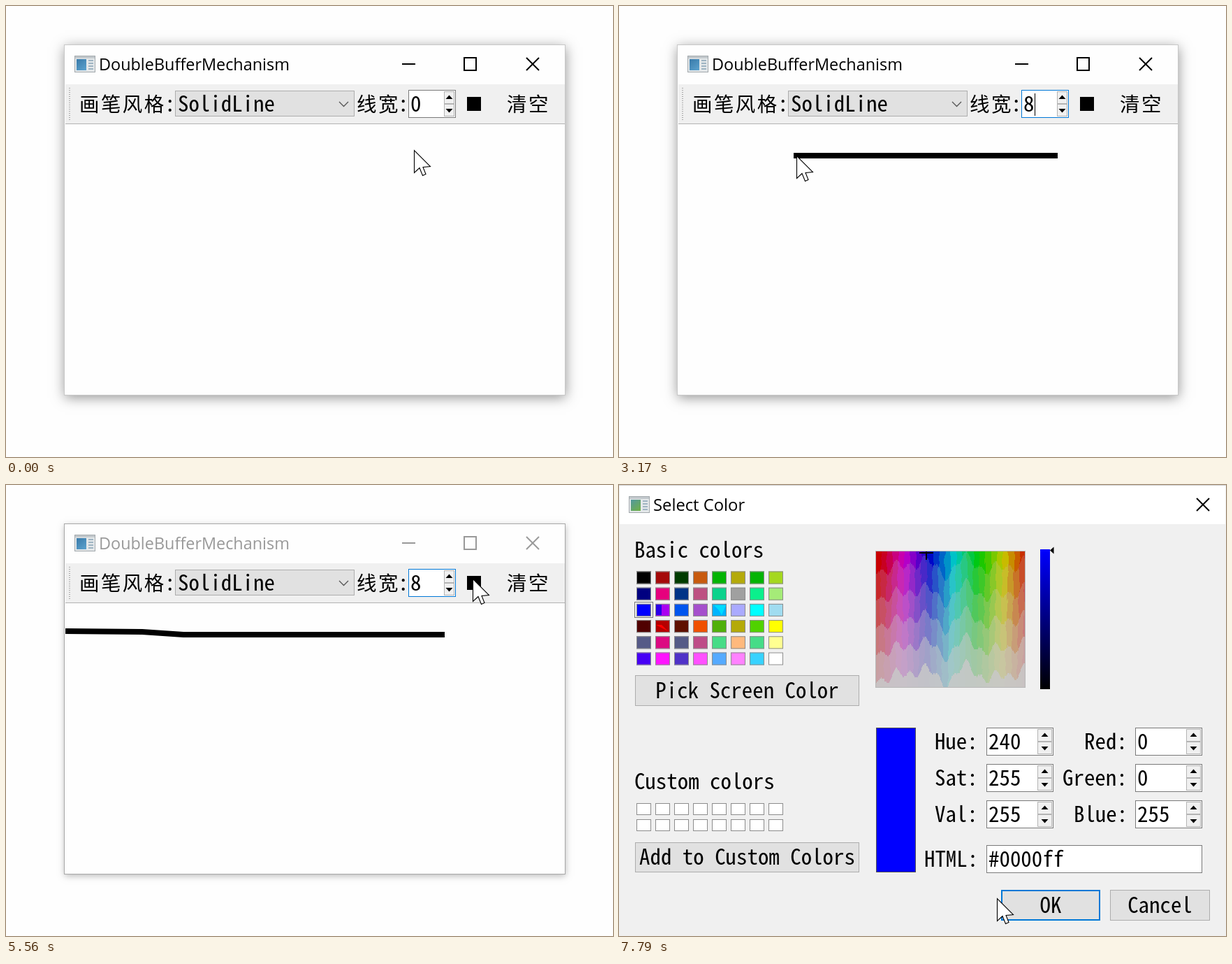
Write an HTML page with a canvas that moves like this. It is 869 by 645 pixels and loops after 7990 ms.

```html
<!DOCTYPE html>
<html lang="zh">
<head>
<meta charset="utf-8">
<title>DoubleBufferMechanism</title>
<style>
  html, body { margin: 0; width: 100%; height: 100%; overflow: hidden; background: #fefefe; }
  canvas { display: block; }
</style>
</head>
<body>
<canvas id="stage" width="869" height="645"></canvas>
<script>
const W = 869, H = 645, LOOP = 7990;
const BLUE = '#0078d7', UI_FONT = '"Open Sans", "Noto Sans", sans-serif';
const MONO = '"Noto Sans Mono CJK SC", "Noto Sans Mono", monospace';
const HAN = '"Noto Sans CJK SC", "Noto Sans CJK", sans-serif';
const CELL = 15.44;

const path = [
  [584, 206], [560, 176], [488, 142], [545, 138], [600, 131], [604, 129], [605, 128], [600, 130],
  [590, 130], [490, 146], [499, 218], [500, 217], [560, 216], [624, 214], [480, 214], [254, 214],
  [195, 210], [89, 209], [215, 213], [353, 229], [430, 190], [486, 150], [560, 146], [605, 131],
  [668, 136], [668, 134], [668, 134], [668, 134], [645, 103], [500, 115], [292, 150], [180, 165],
  [100, 178], [47, 187], [34, 184], [30, 181], [28, 179], [365, 350], [541, 591]
];
const AT = { focus: 6, select: 7, type: 11, draw: 13, drawn: 17, press: 25, inactive: 26, dialog: 28, pick: 37 };
const startOf = i => i && 160 + 200 * i + 10 * ((i > 29) + (i > 31) + (i > 32));
const starts = path.map((_, i) => startOf(i));

const palette = [
  '#000 #a50a0a #003c00 #c85a0e #04b404 #b4aa0a #04b404 #a5d81e',
  '#000f78 #e6007d #003487 #bd5082 #0cd28c #a0a0a0 #0af08c #a5eb78',
  '#4b00f0 #aa00f0 #0055ee #a550cc #00b4ff #aaaaff #0ff #a0dcf0',
  '#500000 #b40000 #5f1000 #f05000 #50b00a #b4aa0a #50d200 #ff0',
  '#555a87 #dc0a82 #555a87 #be4b87 #46dc87 #ffb97d #46dc87 #ffff91',
  '#4600f5 #ff14ff #5032c8 #ff50ff #55aaff #ff82ff #37d2ff #fff'
].map(row => row.split(' '));

function newCanvas(w, h) {
  return Object.assign(document.createElement('canvas'), { width: w, height: h });
}
const screen = document.getElementById('stage').getContext('2d');
const layer = newCanvas(W, H).getContext('2d');
let g = screen;

// Font size that gives the half-width character cell
g.font = `100px ${MONO}`;
const monoSize = 100 * CELL / g.measureText('0').width;

function fill(x, y, w, h, color) {
  g.fillStyle = color;
  g.fillRect(x, y, w, h);
}
function box(x, y, w, h, color, border, line = 1) {
  fill(x, y, w, h, color);
  g.strokeStyle = border;
  g.lineWidth = line;
  g.strokeRect(x + line / 2, y + line / 2, w - line, h - line);
}
function stroke(points, color, width) {
  g.beginPath();
  points.forEach(p => g.lineTo(...p));
  g.strokeStyle = color;
  g.lineWidth = width;
  g.stroke();
}
function polygon(points, color) {
  g.beginPath();
  points.forEach(p => g.lineTo(...p));
  g.closePath();
  g.fillStyle = color;
  g.fill();
}
function text(str, x, y, color, font) {
  g.font = font;
  g.fillStyle = color;
  g.textAlign = 'left';
  g.fillText(str, x, y);
}
const mono = (str, x, y, color = '#000') => text(str, x, y, color, `${monoSize}px ${MONO}`);

function han(str, x, y) {
  [...str].forEach((c, i) => text(c, x + 1 + i * 2 * CELL, y, '#000', `300 28.5px ${HAN}`));
}
function closeMark(x, y, color) {
  stroke([[x - 9, y - 9], [x + 9, y + 9]], color, 2);
  stroke([[x + 9, y - 9], [x - 9, y + 9]], color, 2);
}
function icon(x, y, a, b) {
  box(x, y, 30, 24, '#e4e8ea', '#a2a8ac');
  fill(x + 1, y + 1, 28, 3, '#c3c9cd');
  const shade = g.createLinearGradient(x, y, x + 16, y + 20);
  shade.addColorStop(0, a);
  shade.addColorStop(1, b);
  fill(x + 3, y + 5, 14, 16, shade);
  for (let i = 0; i < 4; i++) fill(x + 20, y + 6 + i * 4, 7, 2, '#9fb4c2');
}
function button(label, x, y, w, h, main) {
  box(x, y, w, h, '#e1e1e1', main ? BLUE : '#adadad', main ? 2 : 1);
  mono(label, x + (w - label.length * CELL) / 2, y + h / 2 + 10.5);
}
function spin(x, y, w, value, arrowWidth, border = '#7a7a7a', color) {
  box(x, y, w, 40, '#fff', border);
  const left = x + w - arrowWidth - 2, mid = left + arrowWidth / 2;
  box(left, y + 2, arrowWidth, 18, '#f0f0f0', '#b4b4b4');
  box(left, y + 20, arrowWidth, 18, '#f0f0f0', '#b4b4b4');
  polygon([[mid - 5, y + 13], [mid + 5, y + 13], [mid, y + 7.5]], '#000');
  polygon([[mid - 5, y + 27], [mid + 5, y + 27], [mid, y + 32.5]], '#000');
  mono(value, x + 3, y + 31, color);
}

function mainWindow(step) {
  const [x, y] = path[step];
  const inside = (l, t, r, b) => step < AT.inactive && x >= l && x <= r && y >= t && y <= b;
  const active = step < AT.inactive, ink = active ? '#000' : '#999';

  g.save();
  g.shadowColor = active ? 'rgba(0,0,0,.42)' : 'rgba(0,0,0,.28)';
  g.shadowBlur = active ? 17 : 9;
  g.shadowOffsetY = active ? 3 : 2;
  fill(84, 56, 717, 501, '#fff');
  g.restore();
  box(83, 55, 718, 502, '#fefefe', active ? '#c8c8c8' : '#a8a8a8');

  icon(98, 71, '#2f6f9f', '#5aa0cc');
  text('DoubleBufferMechanism', 133, 92, ink, `23.4px ${UI_FONT}`);
  stroke([[567, 83], [586, 83]], ink, 2);
  g.strokeRect(656, 74, 17, 18);
  closeMark(754, 83, ink);

  fill(85, 112, 715, 56, '#f0f0f0');
  fill(85, 168, 715, 1, '#b2b2b2');
  for (let i = 117; i < 164; i += 3) fill(90, i, 2, 1, '#aaa');

  han('画笔风格', 104, 151);
  mono(':', 227, 151);
  const hot = inside(242, 121, 499, 158);
  box(242, 121, 257, 37, hot ? '#e5f1fb' : '#e1e1e1', hot ? BLUE : '#adadad');
  mono('SolidLine', 246, 151);
  stroke([[477, 137], [483.5, 143.5], [490, 137]], '#555', 1.3);

  han('线宽', 501, 151);
  mono(':', 561, 151);
  const selected = step >= AT.select && step < AT.type;
  spin(576, 120, 68, step < AT.type ? '0' : '8', 15, step < AT.focus ? '#7a7a7a' : BLUE);
  if (selected) {
    fill(579, 124, 16, 33, BLUE);
    mono('0', 579, 151, '#fff');
  } else if (step >= AT.focus && active && Math.floor(starts[step] / 530) % 2) {
    fill(595, 125, 1, 32, '#000');
  }

  if (inside(643, 114, 697, 166)) {
    box(643, 114, 54, 52, step < AT.press ? '#e5f3ff' : '#cce8ff', step < AT.press ? '#cce8ff' : '#99d1ff');
  }
  fill(660, 130, 20, 20, '#000');
  han('清空', 716, 151);

  if (step > AT.draw) {
    g.save();
    g.beginPath();
    g.rect(85, 169, 715, 386);
    g.clip();
    g.lineCap = 'square';
    stroke(path.slice(AT.draw, Math.min(step, AT.drawn) + 1), '#000', 8);
    g.restore();
  }
}

// Hue and saturation field, split into ragged patches
function makeSpectrum() {
  const w = 213, h = 194, c = newCanvas(w, h), p = c.getContext('2d');
  const wave = (v, k) => Math.sin(v * .13 + k) + Math.sin(v * .31 + k * 2.3) * .7;
  for (let x = 0; x < w; x++) {
    const column = Math.floor(x / 4);
    const ragged = wave(x, 1) * .22 + Math.sin(column * 12.9) * .2;
    for (let y = 0; y < h; y += 2) {
      const level = Math.round((1 - y / h) * 5 + ragged);
      const sat = Math.min(1, Math.max(.03, level / 5));
      const shift = wave(y, column % 7) * 1.2 + level * 1.7;
      const hue = Math.min(359, Math.max(0, Math.round((360 * (1 - x / w) + shift) / 14) * 14));
      const light = .785 * (1 - sat / 2);
      const s = .785 * sat / 2 / Math.min(light, 1 - light);
      p.fillStyle = `hsl(${hue} ${s * 100}% ${light * 100}%)`;
      p.fillRect(x, y, 1, 2);
    }
  }
  return c;
}
const spectrum = makeSpectrum();

function swatches(picked) {
  palette.forEach((row, r) => row.forEach((color, c) => {
    const first = picked && c === 0;
    if (first && r === 1) color = '#000080';
    if (first && r === 2) color = '#0000ff';
    box(25 + 27 * c, 123.5 + 23.2 * r, 21, 18, color, '#8c8c8c');
  }));
  polygon([[136, 172], [153, 172], [147, 186], [143, 179]], '#00dcff');
  if (picked) {
    fill(53, 171, 8, 15, '#2a00e8');
    polygon([[53, 200], [61, 200], [70, 209]], '#f00');
  }
  for (let i = 0; i < 16; i++) {
    box(25 + 27 * (i % 8), 455 + 23 * Math.floor(i / 8), 21, 17, '#fff', '#8c8c8c');
  }
  g.save();
  g.setLineDash([1, 1]);
  g.strokeStyle = '#000';
  g.lineWidth = 1;
  g.strokeRect(22.5, picked ? 167.5 : 121.5, 26, 22);
  g.restore();
}

function dialog(picked) {
  const color = picked ? '#0000ff' : '#000000';
  fill(0, 0, W, H, '#f0f0f0');
  fill(0, 0, W, 1, '#d0d0d0');
  fill(1, 1, W - 2, 55, '#fff');
  icon(14, 16, '#4a90b8', '#6fb04a');
  text('Select Color', 49, 37, '#000', `23.8px ${UI_FONT}`);
  closeMark(836, 28, '#000');

  mono('Basic colors', 22, 104);
  mono('Custom colors', 22, 435);
  swatches(picked);
  button('Pick Screen Color', 23, 272, 321, 44);
  button('Add to Custom Colors', 23, 511, 321, 43);

  box(367, 94, 215, 196, '#ccc', '#b8b8b8');
  g.drawImage(spectrum, 368, 95);
  const [cx, cy] = picked ? [440, 97] : [580.5, 288.5];
  g.save();
  g.beginPath();
  g.rect(368, 95, 214, 195);
  g.clip();
  fill(cx - 10, cy - 1, 20, 2, '#000');
  fill(cx - 1, cy - 10, 2, 20, '#000');
  g.restore();

  const ramp = g.createLinearGradient(0, 92, 0, 292);
  ramp.addColorStop(0, picked ? '#00f' : '#fff');
  ramp.addColorStop(1, '#000');
  box(603, 92, 14, 200, ramp, picked ? ramp : '#a0a0a0');
  const mark = picked ? 93.5 : 291.5;
  polygon([[617, mark], [622.5, mark - 5], [622.5, mark + 5]], '#000');
  box(368, 347, 57, 207, color, '#505050');
  fill(369, 348, 55, 205, color);

  const fields = [
    ['Hue:', 452, 'Red:', 666, '240', '0'],
    ['Sat:', 452, 'Green:', 635, '255', '0'],
    ['Val:', 452, 'Blue:', 651, '255', '255']
  ];
  fields.forEach(([left, lx, right, rx, a, b], i) => {
    const y = 347 + 52 * i;
    mono(left, lx, y + 31);
    spin(526, y, 96, picked ? a : '0', 21);
    mono(right, rx, y + 31);
    spin(739, y, 96, picked ? b : '0', 21);
  });
  mono('HTML:', 437, 546);
  box(526, 515, 309, 40, '#fff', '#7a7a7a');
  mono(color, 529, 546);
  button('OK', 547, 579, 142, 44, true);
  button('Cancel', 703, 579, 143, 44);
}

function pointer(step) {
  const [x, y] = path[step];
  g.save();
  g.translate(x + .5, y + .5);
  const overText = step < AT.press && x > 577 && x < 627 && y > 120 && y < 160;
  if (overText) {
    for (const [color, width] of [['#fff', 3], ['#000', 1]]) {
      stroke([[0, -17], [0, 18]], color, width);
      stroke([[-5, -18], [5, -18]], color, width);
      stroke([[-5, 18], [5, 18]], color, width);
    }
  } else {
    polygon([[0, 0], [0, 32], [7.5, 25], [12, 36], [16.5, 34], [12.5, 24], [23, 23]], '#fff');
    g.strokeStyle = '#000';
    g.lineWidth = 1.1;
    g.stroke();
  }
  g.restore();
}

function render(step) {
  g = screen;
  fill(0, 0, W, H, '#fefefe');
  if (step <= AT.dialog) mainWindow(step);
  if (step >= AT.dialog) {
    g = layer;
    dialog(step >= AT.pick);
    g = screen;
    g.save();
    if (step === AT.dialog) {
      g.globalAlpha = .875;
      g.translate(434.5, 322);
      g.scale(.993, .993);
      g.translate(-434.5, -322);
    }
    g.drawImage(layer.canvas, 0, 0);
    g.restore();
  }
  pointer(step);
}

let origin, shown = -1;
function tick(now) {
  origin ??= now;
  const t = (now - origin) % LOOP;
  const step = starts.findLastIndex(s => s <= t);
  if (step !== shown) render(shown = step);
  requestAnimationFrame(tick);
}
render(0);
requestAnimationFrame(tick);
</script>
</body>
</html>
```
